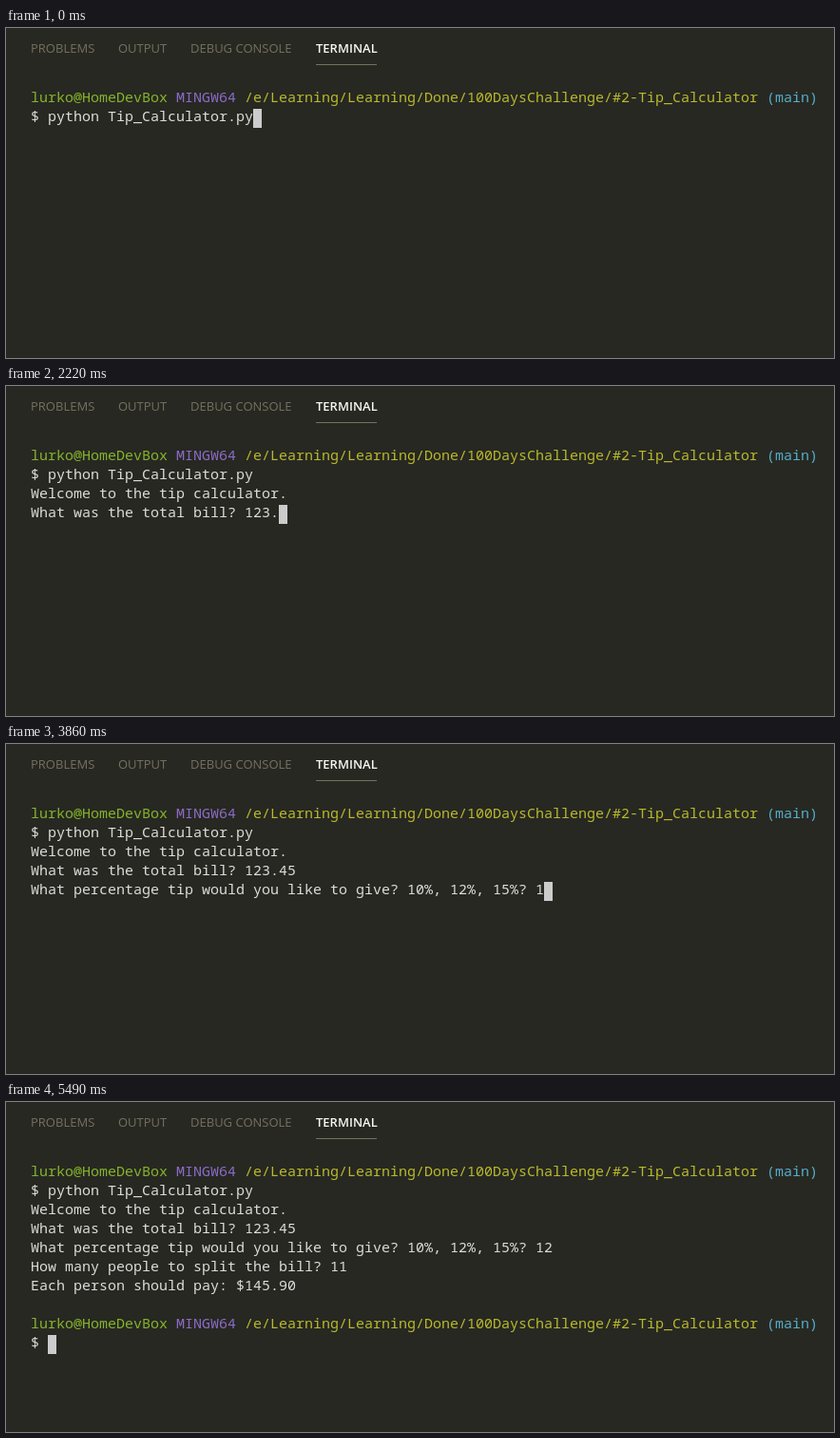
Animation of 871 by 347 pixels, one loop 7.71 s. Source, as an HTML page:

```html
<!DOCTYPE html>
<html lang="en">
<head>
<meta charset="utf-8">
<title>Tip calculator terminal</title>
<style>
  html, body { margin: 0; width: 100%; height: 100%; overflow: hidden; background: #272822; }
  svg { display: block; }
  text { white-space: pre; }
  #tabs { font: 13px "Open Sans", "Noto Sans", sans-serif; fill: #75715e; }
  #tabs .active { fill: #f8f8f2; font-weight: 600; }
  #screen { font: 500 15px "Noto Sans Mono", "DejaVu Sans Mono", monospace; fill: #dcdcd8; }
</style>
</head>
<body>
<svg width="871" height="347" viewBox="0 0 871 347">
  <rect width="871" height="347" fill="#272822"/>
  <g id="tabs">
    <text x="26" y="26">PROBLEMS</text>
    <text x="118" y="26">OUTPUT</text>
    <text x="194" y="26">DEBUG CONSOLE</text>
    <text x="326" y="26" class="active">TERMINAL</text>
    <rect x="326" y="38" width="64" height="1"/>
  </g>
  <g id="screen"></g>
  <rect id="cursor" width="9" height="20" fill="#cccccc"/>
</svg>
<script>
const LOOP = 7710;
const LEFT = 26, TOP = 65, CELL = 9, ROW = 20, BASELINE = 13;

const screenGroup = document.getElementById("screen");
const cursor = document.getElementById("cursor");

const PROMPT = [
  ["lurko@HomeDevBox ", "#86b42b"],
  ["MINGW64 ", "#8c6bc8"],
  ["/e/Learning/Learning/Done/100DaysChallenge/#2-Tip_Calculator ", "#b9b92b"],
  ["(main)", "#56adc8"]
];

// Each step appends its output to the terminal at the given time.
const STEPS = [
  [0, "$ python Tip_Calculator.py"],
  [420, "\nWelcome to the tip calculator.\nWhat was the total bill? "],
  [1630, "1"],
  [1830, "23"],
  [2220, "."],
  [2440, "4"],
  [2640, "5"],
  [2840, "\nWhat percentage tip would you like to give? 10%, 12%, 15%? "],
  [3860, "1"],
  [4060, "2"],
  [4280, "\nHow many people to split the bill? "],
  [5080, "1"],
  [5280, "1"],
  [5490, "\nEach person should pay: $145.90\n\n\n$ "]
];
const FIRST_ROW = 1, SECOND_PROMPT_ROW = 8, ROW_COUNT = 9;

function addText(row, column, content, color) {
  const node = document.createElementNS("http://www.w3.org/2000/svg", "text");
  node.setAttribute("x", LEFT + column * CELL);
  node.setAttribute("y", TOP + row * ROW + BASELINE);
  if (color) node.setAttribute("fill", color);
  node.textContent = content;
  screenGroup.append(node);
  return node;
}

function addPrompt(row) {
  let column = 0;
  return PROMPT.map(([content, color]) => {
    const node = addText(row, column, content, color);
    column += content.length;
    return node;
  });
}

addPrompt(0);
const secondPrompt = addPrompt(SECOND_PROMPT_ROW);
const rows = Array.from({ length: ROW_COUNT }, (_, i) => addText(FIRST_ROW + i, 0, ""));

function render(time) {
  const lines = STEPS.filter(([start]) => start <= time)
    .map(([, output]) => output).join("").split("\n");
  const lastRow = FIRST_ROW + lines.length - 1;

  rows.forEach((node, i) => { node.textContent = lines[i] || ""; });
  const visibility = lastRow > SECOND_PROMPT_ROW ? "visible" : "hidden";
  secondPrompt.forEach(node => node.setAttribute("visibility", visibility));
  cursor.setAttribute("x", LEFT + lines.at(-1).length * CELL);
  cursor.setAttribute("y", TOP + lastRow * ROW);
}

const began = performance.now();
function tick() {
  render((performance.now() - began) % LOOP);
  requestAnimationFrame(tick);
}
tick();
</script>
</body>
</html>
```
